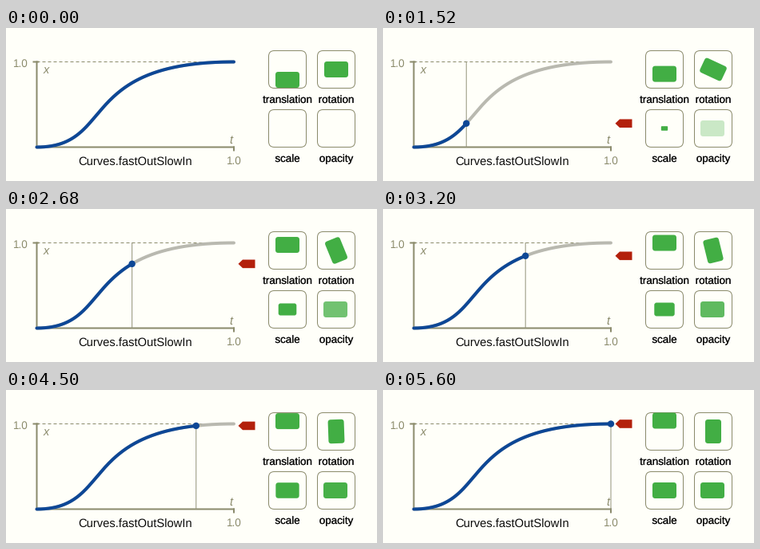
A matplotlib script that plays this animation: 464 by 192 pixels, repeating every 5.62 s.

```python
import numpy as np
import matplotlib.pyplot as plt
from matplotlib.animation import FuncAnimation
from matplotlib.patches import Circle, FancyBboxPatch, Polygon
from matplotlib.patheffects import withStroke
from matplotlib.transforms import Affine2D

W, H, DPI = 464, 192, 64
PT = 72 / DPI                      # points per pixel
TICK, TICKS, STEPS = 20, 281, 120  # 281 ticks of 20 ms, 120 motion steps

BG, OLIVE, PALE = "#fffff9", "#8b8b6c", "#b9b9b0"
BLUE, GREEN, RED, INK = "#0d4796", "#42ae44", "#b3200c", "#0c0c0c"
LEFT, RIGHT, TOP, BOTTOM = 38.5, 285, 42.5, 149.5

plt.rcParams["font.family"] = "Liberation Sans"
plt.rcParams["text.hinting"] = "none"
fig = plt.figure(figsize=(W / DPI, H / DPI), dpi=DPI, facecolor=BG)
ax = fig.add_axes([0, 0, 1, 1])
ax.set(xlim=(0, W), ylim=(H, 0))
ax.axis("off")


def ease(t):
    """Cubic Bezier (0.4, 0, 0.2, 1)."""
    s = np.linspace(0, 1, 400)
    x = 1.2 * s * (1 - s) ** 2 + 0.6 * s**2 * (1 - s) + s**3
    return np.interp(t, x, 3 * s**2 - 2 * s**3)


def to_px(t):
    return LEFT + (RIGHT - LEFT) * t, BOTTOM - (BOTTOM - TOP) * ease(t)


def line(xs, ys, color, width, z, **kw):
    # snapping would push half-pixel positions onto the next pixel
    return ax.plot(xs, ys, color=color, lw=width * PT, zorder=z,
                   snap=False, **kw)[0]


def label(x, y, s, size, color=INK, weight=0, **kw):
    text = ax.text(x, y, s, fontsize=size * PT, color=color, ha="center",
                   va="baseline", zorder=6, **kw)
    if weight:
        text.set_path_effects([withStroke(linewidth=weight * PT, foreground=color)])


def box(w, h, r, z, **kw):
    return ax.add_patch(FancyBboxPatch(
        (-w / 2, -h / 2), w, h, boxstyle=f"round,pad=0,rounding_size={r}",
        zorder=z, snap=False, **kw))


def place(patch, x, y, angle=0, scale=1):
    patch.set_transform(Affine2D().scale(scale).rotate_deg(angle)
                        .translate(x, y) + ax.transData)


# Graph
line([LEFT, RIGHT], [TOP, TOP], OLIVE, 1, 1, dashes=(4, 3))
line([LEFT, LEFT, RIGHT], [TOP, BOTTOM, BOTTOM], OLIVE, 2, 1)
line([34.5, 40], [TOP, TOP], OLIVE, 2, 1)
line([RIGHT, RIGHT], [BOTTOM, 153.5], OLIVE, 2, 1)
line(*to_px(np.linspace(0, 1, 200)), PALE, 4, 2, solid_capstyle="round")
label(18.5, 49, "1.0", 13.5, OLIVE)
label(285, 171, "1.0", 13.5, OLIVE)
label(50.2, 57, "x", 14.5, OLIVE, style="italic")
label(281.5, 145, "t", 14.5, OLIVE, style="italic")
label(162, 173, "Curves.fastOutSlowIn", 14.7)

# Tiles
for name, x, y in (("translation", 352, 52), ("rotation", 413, 52),
                   ("scale", 352, 126), ("opacity", 413, 126)):
    place(box(47, 47, 7, 2, fc="none", ec=OLIVE, lw=PT), x, y)
    label(x, y + 42, name, 13.4, weight=.15)

mover, spinner, grower, fader = (box(30, 20, 3.5, 3, fc=GREEN, ec="none")
                                 for _ in range(4))
place(fader, 412, 126)

# Moving parts of the graph
done = line([], [], BLUE, 4, 4, solid_capstyle="round")
rule = line([], [], "#94947c", 1, 3)
dot = ax.add_patch(Circle((0, 0), 4.2, fc=BLUE, ec="none", zorder=5))
marker = ax.add_patch(Polygon(
    [(290.5, 0), (296, -5.3), (311.5, -5.3), (311.5, 5.3), (296, 5.3)],
    fc=RED, ec="none", zorder=5))


def step_at(tick):
    # three steps every 140 ms, held for 20, 100 and 20 ms
    group, rest = divmod(tick, 7)
    return 3 * group + (rest > 0) + (rest > 5)


def draw(tick):
    t = step_at(tick) / STEPS
    v = float(ease(t))
    x, y = to_px(t)
    running = t > 0
    done.set_data(*to_px(np.linspace(0, t if running else 1, 160)))
    rule.set_data([x, x], [TOP, BOTTOM])
    dot.center = x, y
    place(marker, 0, y)
    for part in (rule, dot, marker):
        part.set_visible(running)

    place(mover, 352, 65 - 26.5 * v)
    place(spinner, 413, 52, angle=90 * v)
    place(grower, 352, 126, scale=max(v, 1e-3))
    grower.set_visible(running)
    fader.set_alpha(v)
    return done, rule, dot, marker, mover, spinner, grower, fader


anim = FuncAnimation(fig, draw, frames=TICKS, interval=TICK,
                     repeat=True, repeat_delay=0, blit=False)
plt.show()
```
